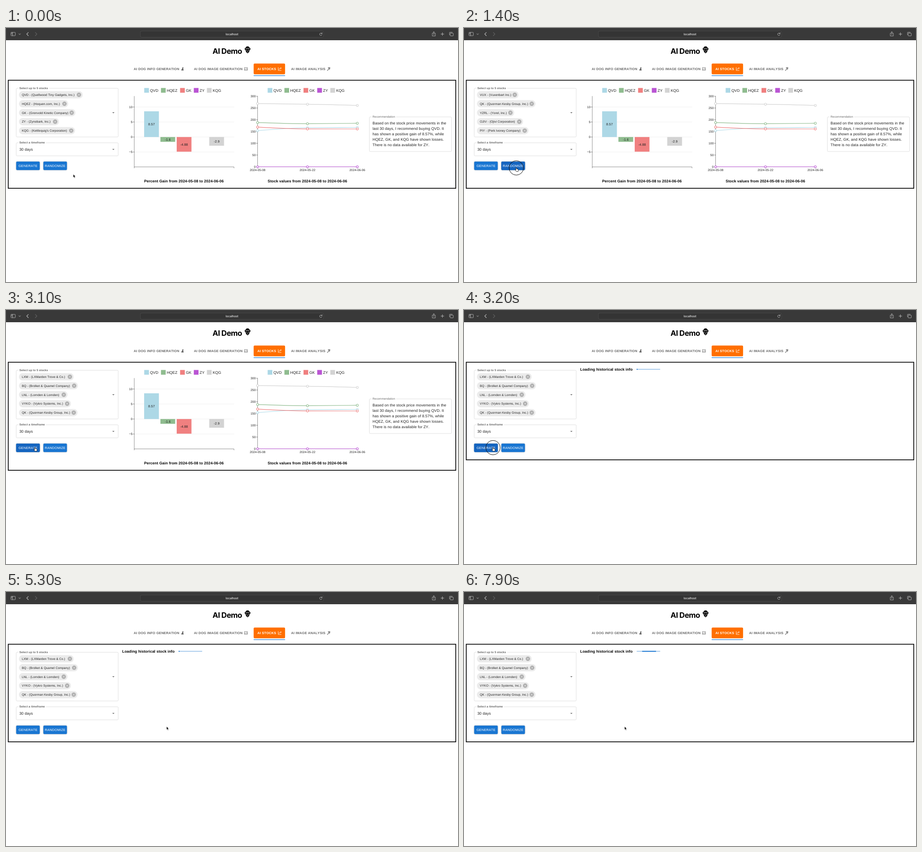
Animation, 998 px wide and 561 px high, one loop 8 s. Source, as an HTML page:

```html
<!DOCTYPE html>
<html lang="en">
<head>
<meta charset="utf-8">
<title>AI Demo</title>
<style>
  html, body { margin: 0; width: 100%; height: 100%; overflow: hidden; background: #fff; }
  svg { display: block; }
  text { font-family: "Liberation Sans", Arial, sans-serif; letter-spacing: .00938em; font-kerning: none;
         text-rendering: geometricPrecision; white-space: pre; }
  .ui { font-family: Inter, sans-serif; }
  .caps { letter-spacing: .02857em; }
  .plain { letter-spacing: 0; }
  .line { fill: none; stroke-linecap: round; stroke-linejoin: round; }
  .button { filter: drop-shadow(0 .8px .8px rgba(0,0,0,.35)); }
</style>
</head>
<body>
<svg id="stage" width="998" height="561" viewBox="0 0 998 561"></svg>
<script>
const LOOP = 8000, LOAD = 3180;
const BLUE = '#1976d2', DARK = '#1565c0', INK = '#212121', GREY = '#666';

const text = (x, y, str, size, fill = INK, extra = '') =>
  `<text x="${x}" y="${y}" font-size="${size}" fill="${fill}" ${extra}>${str}</text>`;
const rect = (x, y, w, h, fill, extra = '') =>
  `<rect x="${x}" y="${y}" width="${w}" height="${h}" fill="${fill}" ${extra}/>`;
const line = (d, stroke, width = .55, extra = '') =>
  `<path class="line" d="${d}" stroke="${stroke}" stroke-width="${width}" ${extra}/>`;
const BOLD = 'font-weight="700"', MID = 'text-anchor="middle"', END = 'text-anchor="end"';

const stocks = [
  [['QVD - (Quellwood Tiny Gadgets, Inc.)', 161], ['HQEZ - (Hoquen.com, Inc.)', 129],
   ['GK - (Grenvold Kinetic Company)', 145], ['ZY - (Zynobark, Inc.)', 108.5],
   ["KQG - (Kettlequig's Corporation)", 144]],
  [['VUX - (Vuxenbart Inc.)', 112], ['QK - (Quorman Kesby Group, Inc.)', 149.5],
   ['YZRL - (Yorel, Inc.)', 102.5], ['OJIV - (Ojivi Corporation)', 122],
   ['PIY - (Perk Ivoney Company)', 134]],
  [['LXM - (LXMarden Trove &amp; Co.)', 141], ['BQ - (Brolket &amp; Quamel Company)', 150.5],
   ['LNL - (Lornden &amp; Lornden)', 127.5], ['VYKO - (Vykro Systems, Inc.)', 135],
   ['QK - (Quorman Kesby Group, Inc.)', 149.5]],
];
// ticker, colour, legend x, percent gain, line heights
const series = [
  ['QVD', '#add8e6', 305.2, 8.57, [226.8, 220.2, 219.7]],
  ['HQEZ', '#8fbc8f', 342.2, -1.6, [208.9, 211.4, 210.4]],
  ['GK', '#f08080', 384.4, -4.88, [218.9, 222.9, 223]],
  ['ZY', '#ba55d3', 414.7, 0, [306.5, 306.5, 306.5]],
  ['KQG', '#d3d3d3', 443.6, -2.9, [166.9, 168.4, 171]],
];

function browserBar() {
  const c = '#c4c4c4';
  return rect(0, 0, 998, 27, '#393939') +
    rect(296.7, 6.7, 404.6, 13.8, '#343434', 'rx="3" stroke="#515151" stroke-width=".7"') +
    text(499, 16, 'localhost', 6.5, '#f0f0f0', `class="ui plain" font-weight="500" ${MID}`) +
    line('M12 9.6h7.6q1 0 1 1v5.4q0 1-1 1h-7.6q-1 0-1-1v-5.4q0-1 1-1M14.5 9.6v7.4M12.2 11.4h1M12.2 13h1', c, .8) +
    line('M28.3 12.7l1.9 1.8 1.9-1.8', c, .9) + line('M49.3 9.8l-3.6 3.6 3.6 3.6', c, 1.1) +
    line('M64.7 9.8l3.6 3.6-3.6 3.6', '#666', 1.1) +
    line('M697.6 12.2a2.8 2.8 0 1 0 .3 2.6M698 10.2v2.4h-2.4', c, .8) +
    line('M943 11.6h-1.8v6h6.8v-6h-1.8M944.6 14.6v-6.4m-1.9 1.8l1.9-1.9 1.9 1.9', c, .8) +
    line('M960.4 13.4h6.4M963.6 10.2v6.4', c, .9) +
    line('M981.6 11.4h5.2q.8 0 .8.8v4.4q0 .8-.8.8h-5.2q-.8 0-.8-.8v-4.4q0-.8.8-.8M979.2 15.2v-5q0-.8.8-.8h5.4', c, .8);
}

function heading() {
  const tab = (x, label, fill = GREY) => text(x, 93.2, label, 7.31, fill, `class="caps" ${BOLD}`);
  return text(456, 57, 'AI Demo', 16.7, '#000', `class="ui" style="letter-spacing:-.03em" ${BOLD}`) +
    '<path d="M533.4 40.6q3.2 0 4.4 3.2l2.2 1.6-1 3.2-1.4.4q0 4-2 5.4l-2.2 1.4-2.2-1.4q-2-1.4-2-5.4l-1.4-.4-1-3.2 2.2-1.6q1.2-3.2 4.4-3.2z"/>' +
    line('M529.2 46.2q4.2-2 8.4 0M531 49.4h1.4M534.6 49.4h1.4M532 52.8q1.4-1 2.8 0', '#fff', .9) +
    rect(546.8, 78.5, 69.4, 23.8, '#ff6f00', 'rx="2.2"') + rect(546.8, 104.7, 69.4, 1.2, BLUE) +
    tab(282, 'AI DOG INFO GENERATION') + tab(415, 'AI DOG IMAGE GENERATION') +
    tab(555, 'AI STOCKS', '#fff') + tab(629.6, 'AI IMAGE ANALYSIS') +
    `<path fill="${GREY}" d="M389.6 86.6l2.6 1.2-.4 1.2-1.2.2q1.8 1.6 1.6 4.6h-5q-.6-1.6.6-2.6 1.4-1 1.4-2.8z"/>` +
    line('M526.9 87.4h6.2v6h-6.2zM527.2 92.2l1.8-1.9 1.3 1.1 1.2-1.7 1.5 2', GREY, .8) +
    line('M601 87v6.8h6.6M602.4 91.6l1.5-2 1.4 1.1 2-2.7m-1.5 0h1.5v1.5', '#fff', .8) +
    line('M709.6 94l3.4-3.6', GREY, 1.1) + line('M711.4 87.6l3.2 3.4M713 87.4h2v2', GREY, 1.3);
}

const fieldset = (x, y, w, h, label, labelWidth, weight = '') =>
  rect(x, y, w, h, 'none', 'rx="2" stroke="#c4c4c4" stroke-width=".55"') +
  rect(x + 4.5, y - 1, labelWidth + 5, 2, '#fff') + text(x + 7, y + 1.7, label, 6.26, GREY, weight);

function chip([label, iconX], i) {
  const y = 147.5 + i * 19.8;
  return rect(28.6, y - 8, iconX - 20.2, 16, '#ebebeb', 'rx="8"') + text(34.9, y + 2.5, label, 6.79) +
    `<circle cx="${iconX}" cy="${y}" r="4.8" fill="#aeaeae"/>` +
    line(`M${iconX - 1.7} ${y - 1.7}l3.4 3.4m0-3.4l-3.4 3.4`, '#ebebeb', 1);
}

const button = (id, x, label) => `<g class="button" id="${id}">${rect(x, 295, 52, 18.8, BLUE, 'rx="2.1"')}
  ${rect(x, 295, 52, 18.8, DARK, 'rx="2.1" class="dark"')}
  <svg x="${x}" y="295" width="52" height="18.8"><circle class="ripple" fill="#fff"/></svg>
  ${text(x + 26.1, 307.1, label, 7.31, '#fff', `class="caps" ${MID}`)}</g>`;

function form() {
  const arrow = y => `<path d="M234.5 ${y}h5.2l-2.6 2.6z" fill="#757575"/>`;
  return fieldset(22.5, 133.1, 225.3, 107.6, 'Select up to 5 stocks', 63.5, BOLD) +
    fieldset(22.5, 253.6, 225.3, 28.8, 'Select a timeframe', 56.5, BOLD) +
    stocks.map((set, i) => `<g id="set${i}">${set.map(chip).join('')}</g>`).join('') +
    arrow(186) + arrow(267) + text(29.4, 270.9, '30 days', 8.35) +
    button('generate', 22.5, 'GENERATE') + button('randomize', 82.5, 'RANDOMIZE');
}

const legend = dx => series.map(([name, color, x]) => rect(x + dx, 132.5, 10.4, 10.4, color) +
  text(x + dx + 12.9, 140.8, name, 8.35, INK, 'class="plain"')).join('');

function barChart() {
  const yOf = v => 240.8 - v * 6.63;
  let out = '';
  for (const v of [10, 5, 0, -5]) {
    const y = yOf(v);
    out += line(`M283.2 ${y}H503.3`, '#e2e2e2', .5) + line(`M280.2 ${y}h3`, '#333') +
      text(279.2, y + 2.4, String(v).replace('-', '−'), 6.79, INK, `class="plain" ${END}`);
  }
  series.forEach(([, color, , gain], i) => {
    if (!gain) return;
    const x = 305 + i * 35.95, y = yOf(gain);
    out += rect(x, Math.min(y, 240.8), 32.6, Math.abs(y - 240.8), color) +
      text(x + 16.3, (y + 240.8) / 2 + 2.6, gain, 7.31, INK, MID);
  });
  return out + legend(0) + line('M283.2 150.8V309.4M283.2 306.8H503.3v2.6', '#333') +
    text(392.8, 341.4, 'Percent Gain from 2024-05-08 to 2024-06-06', 8.35, '#000', `${BOLD} ${MID}`);
}

// Monotone cubic through three evenly spaced points
function curve([a, b, c], x, step) {
  const s = (b - a) / step, u = (c - b) / step;
  const m = s * u <= 0 ? 0 : Math.sign(s) * Math.min(Math.abs(s), Math.abs(u));
  const k = step / 3, start = (3 * s - m) / 2, end = (3 * u - m) / 2;
  return `M${x} ${a}C${x + k} ${a + k * start} ${x + 2 * k} ${b - k * m} ${x + step} ${b}` +
    `S${x + 5 * k} ${c - k * end} ${x + 2 * step} ${c}`;
}

function lineChart() {
  const x0 = 555.5, step = 110.1;
  let out = legend(272.5) + line(`M${x0} 150.8V306.6H${x0 + 2 * step}`, '#333');
  for (let v = 0; v <= 300; v += 50) {
    const y = 306.6 - v * .5193;
    out += line(`M552.5 ${y}h3`, '#333') + text(551.4, y + 2.4, v, 6.79, INK, `class="plain" ${END}`);
  }
  ['2024-05-08', '2024-05-22', '2024-06-06'].forEach((day, i) => {
    const x = x0 + i * step;
    out += line(`M${x} 306.6v3`, '#333') + text(x, 316.1, day, 6.79, INK, `class="plain" ${MID}`);
  });
  for (const [, color, , , ys] of series) out += line(curve(ys, x0, step), color, 1.1);
  for (const [, color, , , ys] of series) ys.forEach((y, i) => {
    out += `<circle cx="${x0 + i * step}" cy="${y}" r="2.3" fill="#fff" stroke="${color}" stroke-width="1.05"/>`;
  });
  return out + text(665.5, 341.4, 'Stock values from 2024-05-08 to 2024-06-06', 8.35, '#000', `${BOLD} ${MID}`);
}

const advice = () => fieldset(802.3, 196.4, 181.4, 76.4, 'Recommendation', 49.8) + [
  'Based on the stock price movements in the', 'last 30 days, I recommend buying QVD. It',
  'has shown a positive gain of 8.57%, while', 'HQEZ, GK, and KQG have shown losses.',
  'There is no data available for ZY.',
].map((row, i) => text(809.3, 213.4 + i * 11.95, row, 8.35)).join('');

const loading = () => text(256.5, 133.7, 'Loading historical stock info', 8.35, '#000', BOLD) +
  `<svg x="381.2" y="129.8" width="52.2" height="2.1">${rect(0, 0, 52.2, 2.1, '#a7caed')}
   ${rect(0, 0, 0, 2.1, BLUE, 'id="bar1"')}${rect(0, 0, 0, 2.1, BLUE, 'id="bar2"')}</svg>`;

const cursor = () => `<g id="cursor" stroke-linejoin="round">
  <circle id="ring" cy="1" r="15.9" fill="none" stroke="#111" stroke-width="1"/>
  <path id="arrow" d="M0 0v7.2l1.6-1.5 1.2 2.7 1.3-.6-1.2-2.6h2.2z" stroke="#fff" stroke-width=".6"/>
  <path id="hand" d="M-.7.7q.7-.9 1.3 0l.4 2.6 2.6.6q1.3.4 1 2l-.6 3h-4l-2.4-3.2q-.1-1.1 1.5-.3z" fill="#fff" stroke="#000" stroke-width=".8"/>
  </g>`;

const stage = document.getElementById('stage');
stage.innerHTML = browserBar() + heading() +
  '<rect id="frame" x="4.9" y="115.4" width="988.2" fill="none" stroke="#000" stroke-width="1.7"/>' +
  form() + `<g id="charts">${barChart()}${lineChart()}${advice()}</g><g id="loading">${loading()}</g>` + cursor();

const get = id => document.getElementById(id);
const show = (id, on) => get(id).setAttribute('visibility', on ? 'visible' : 'hidden');
const set = (el, attrs) => { for (const k in attrs) el.setAttribute(k, attrs[k]); };
const ramp = (t, from, to) => Math.min(1, Math.max(0, (t - from) / (to - from)));
const smooth = k => k * k * (3 - 2 * k);

function bezier(x1, y1, x2, y2) {
  const at = (a, b, u) => 3 * a * u * (1 - u) ** 2 + 3 * b * u * u * (1 - u) + u ** 3;
  return x => {
    let lo = 0, hi = 1;
    for (let i = 0; i < 25; i++) {
      const mid = (lo + hi) / 2;
      if (at(x1, x2, mid) < x) lo = mid; else hi = mid;
    }
    return at(y1, y2, (lo + hi) / 2);
  };
}
const ease1 = bezier(.65, .815, .735, .395), ease2 = bezier(.165, .84, .44, 1);

// Each bar sweeps in the first 60% of a 2.1 s cycle; positions are shares of the track
function sweep(id, t, ease, left0, left1, right1) {
  const p = t < 0 ? 0 : ease(Math.min(1, t % 2100 / 1260));
  const left = left0 + (left1 - left0) * p;
  set(get(id), { x: left * 52.2, width: Math.max(0, right1 * p - left) * 52.2 });
  show(id, t >= 0 && t >= 0 && p > 0 && get('loading').getAttribute('visibility') === 'visible');
}

const moves = [[130, 650, 115.5, 308], [2600, 3000, 64, 303], [3470, 4300, 354.5, 297]];
const clicks = [[750, 890, 'randomize', 33], [1400, 1560, 'randomize', 33], [3150, 3300, 'generate', 41.5]];
const hovers = { randomize: [430, 2840], generate: [2885, 3260] };

function render(t) {
  let x = 148.5, y = 323;
  for (const [from, to, toX, toY] of moves) {
    const k = smooth(ramp(t, from, to));
    x += (toX - x) * k;
    y += (toY - y) * k;
  }
  const overButton = y > 295 && y < 314 && (x > 22 && x < 74.5 || x > 82.5 && x < 134.5);
  set(get('cursor'), { transform: `translate(${x} ${y})` });
  show('arrow', !overButton);
  show('hand', overButton);
  show('ring', clicks.some(([down, up]) => t >= down && t < up));

  for (const id in hovers) {
    const [enter, leave] = hovers[id], group = get(id);
    const dark = ramp(t, enter, enter + 200) - ramp(t, leave, leave + 200);
    set(group.querySelector('.dark'), { opacity: dark });
    const click = clicks.find(c => c[2] === id && t >= c[0] && t < c[0] + 500);
    const age = click ? t - click[0] : 0;
    set(group.querySelector('.ripple'), {
      cx: click ? click[3] : 0, cy: 11, r: 45 * smooth(ramp(age, 0, 450)), opacity: .3 * (1 - ramp(age, 150, 500)),
    });
  }

  const current = t < 850 ? 0 : t < 1500 ? 1 : 2;
  stocks.forEach((_, i) => show('set' + i, i === current));

  const busy = t >= LOAD;
  show('charts', !busy);
  show('loading', busy);
  set(get('frame'), { height: busy ? 215.5 : 238.6 });
  sweep('bar1', t - LOAD, ease1, -.35, 1, 1.9);
  sweep('bar2', t - LOAD - 1150, ease2, -2, 1.07, 1.08);
}

function tick() {
  render(performance.now() % LOOP);
  requestAnimationFrame(tick);
}
tick();
</script>
</body>
</html>
```
